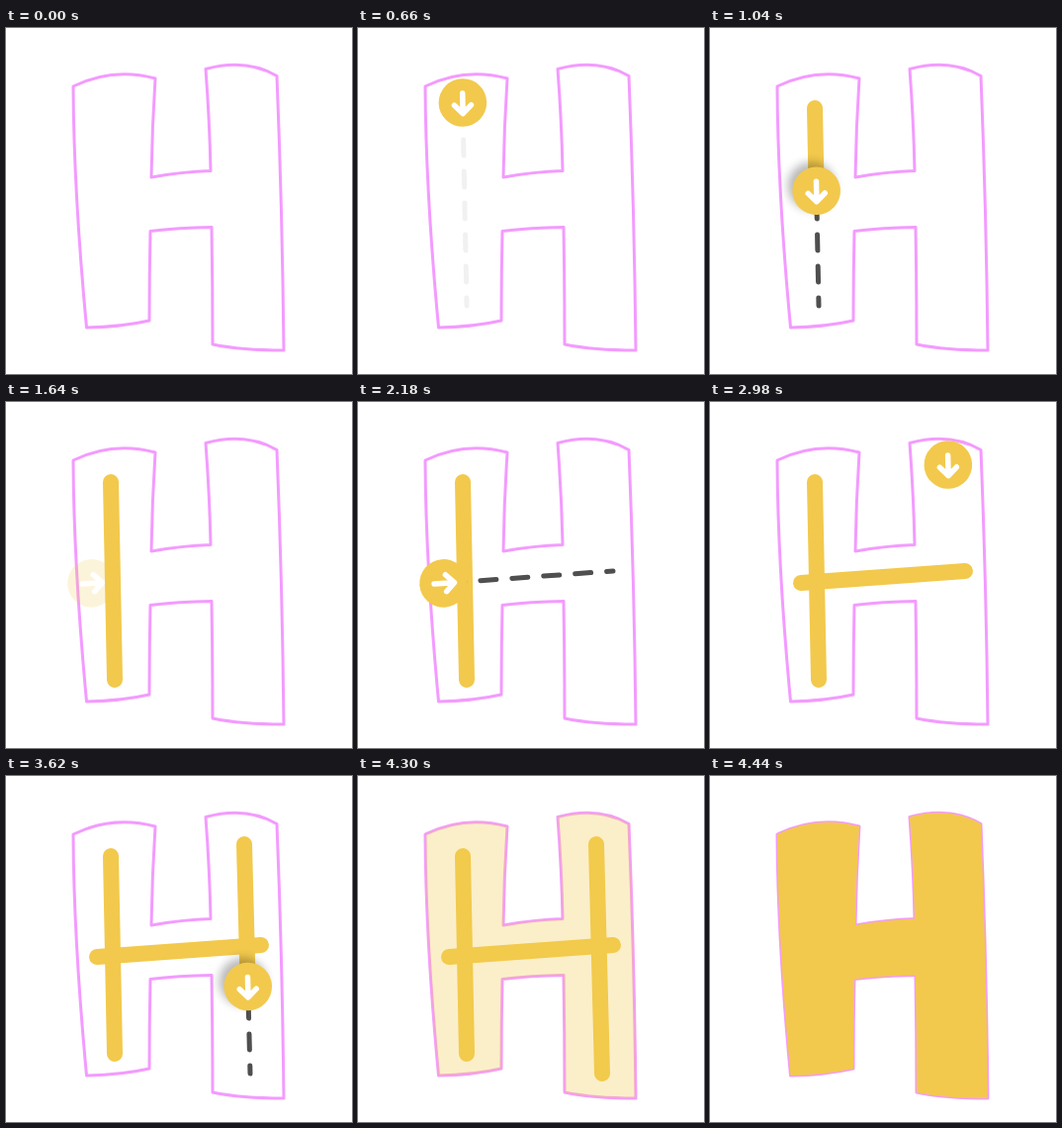
Write an HTML page that moves like this. It is 350 px wide and 350 px high and loops after 6000 ms.

```html
<!DOCTYPE html>
<html lang="en">
<head>
<meta charset="utf-8">
<title>Writing the letter H</title>
<style>
  html, body { margin: 0; width: 100%; height: 100%; overflow: hidden; background: #fff; }
  svg { display: block; width: 100vw; height: 100vh; }
  path, line { fill: none; stroke-linecap: round; stroke-linejoin: round; }
  .outline { stroke: #f39bff; stroke-width: 3; }
  .dashes { stroke: #4f4f4f; stroke-width: 5; stroke-dasharray: 16 16; }
  .ink { stroke: #f2c94c; stroke-width: 16; }
  .arrow { stroke: #fff; stroke-width: 5.5; }
  #fill, .disc { fill: #f2c94c; }
</style>
</head>
<body>
<svg viewBox="0 0 350 350">
  <defs>
    <filter id="blur" x="-50%" y="-50%" width="200%" height="200%">
      <feGaussianBlur stdDeviation="5"/>
    </filter>
    <path id="letter" d="M68 59 Q108 39.5 151 51 Q147.8 100 147 151 Q177 145.5 207 144.5
      Q206 95 202 41.5 Q243 30.5 274 48.5 Q279.5 185 281 326 Q238 326 209 320
      Q209 260 208 201.5 Q174 202 146 205.5 Q145 250 145 296 Q116 302.5 81.5 303 Q68.5 165 68 59Z"/>
  </defs>
  <path class="outline" d=""/>
  <g id="strokes"></g>
  <g id="ball">
    <circle id="shadow" cx="-5" cy="5" r="24" filter="url(#blur)"/>
    <circle class="disc" r="24.3"/>
    <path class="arrow" d="M-9.5 0H10.5M2.5 -8.5L11 0L2.5 8.5"/>
  </g>
  <path id="fill" d=""/>
</svg>
<script>
const LOOP = 6000, STEP = 20, MOVE = 290, DASH_FADE = 250;
const LAG = 5.5;   // the ball trails the tip of the ink

// Each stroke: end points, ball fade in, dash start, end of the move, ball fade out, slide while fading
const strokes = [
  { from: [106, 81], to: [110, 281], show: [20, 200], dash: 640, end: 1195, hide: [1360, 1480], slide: [4, 6] },
  { from: [92, 183], to: [258, 171], show: [1620, 1720], dash: 1880, end: 2492, hide: [2620, 2720], slide: [0, 0] },
  { from: [241, 69], to: [247, 301], show: [2880, 2980], dash: 3180, end: 3738, hide: [3860, 3960], slide: [0, 0] }
];

const $ = id => document.getElementById(id);
const ramp = (t, a, b) => Math.min(1, Math.max(0, (t - a) / (b - a)));
const ease = u => (1 - Math.cos(Math.PI * u)) / 2;

const shape = $('letter').getAttribute('d');
document.querySelector('.outline').setAttribute('d', shape);
$('fill').setAttribute('d', shape);

function addLine(className, [x1, y1], [x2, y2]) {
  const line = document.createElementNS('http://www.w3.org/2000/svg', 'line');
  line.setAttribute('class', className);
  Object.entries({ x1, y1, x2, y2 }).forEach(([key, value]) => line.setAttribute(key, value));
  return $('strokes').appendChild(line);
}

for (const s of strokes) {
  const dx = s.to[0] - s.from[0], dy = s.to[1] - s.from[1];
  s.length = Math.hypot(dx, dy);
  s.dir = [dx / s.length, dy / s.length];
  s.angle = Math.atan2(dy, dx) * 180 / Math.PI;
  s.dashes = addLine('dashes', s.from, s.to);
  s.ink = addLine('ink', s.from, s.from);
}

function pointOn(s, distance) {
  return s.from.map((start, i) => start + s.dir[i] * distance);
}

function draw(t) {
  let ballOpacity = 0;
  for (const s of strokes) {
    const moveStart = s.end - MOVE;
    const progress = ease(ramp(t, moveStart, s.end));
    const [tipX, tipY] = pointOn(s, progress * s.length);
    s.ink.setAttribute('x2', tipX);
    s.ink.setAttribute('y2', tipY);
    s.ink.setAttribute('opacity', t > moveStart ? 1 : 0);
    s.dashes.setAttribute('opacity', t < s.end ? ramp(t, s.dash, s.dash + DASH_FADE) : 0);

    if (t < s.show[0] || t >= s.hide[1]) continue;
    const shown = ramp(t, ...s.show), hidden = ramp(t, ...s.hide);
    const slide = s.slide[0] * (1 - shown) + s.slide[1] * hidden;
    const center = pointOn(s, progress * s.length - LAG - slide);
    ballOpacity = shown * (1 - hidden);
    $('ball').setAttribute('transform', `translate(${center}) rotate(${s.angle})`);
    $('shadow').setAttribute('opacity', 0.28 * Math.min(1, 1.6 * Math.sin(Math.PI * progress)));
  }
  $('ball').setAttribute('opacity', ballOpacity);
  $('fill').setAttribute('opacity', ramp(t, 4240, 4440));
}

function frame() {
  draw(Math.floor(performance.now() % LOOP / STEP) * STEP);
  requestAnimationFrame(frame);
}
frame();
</script>
</body>
</html>
```
